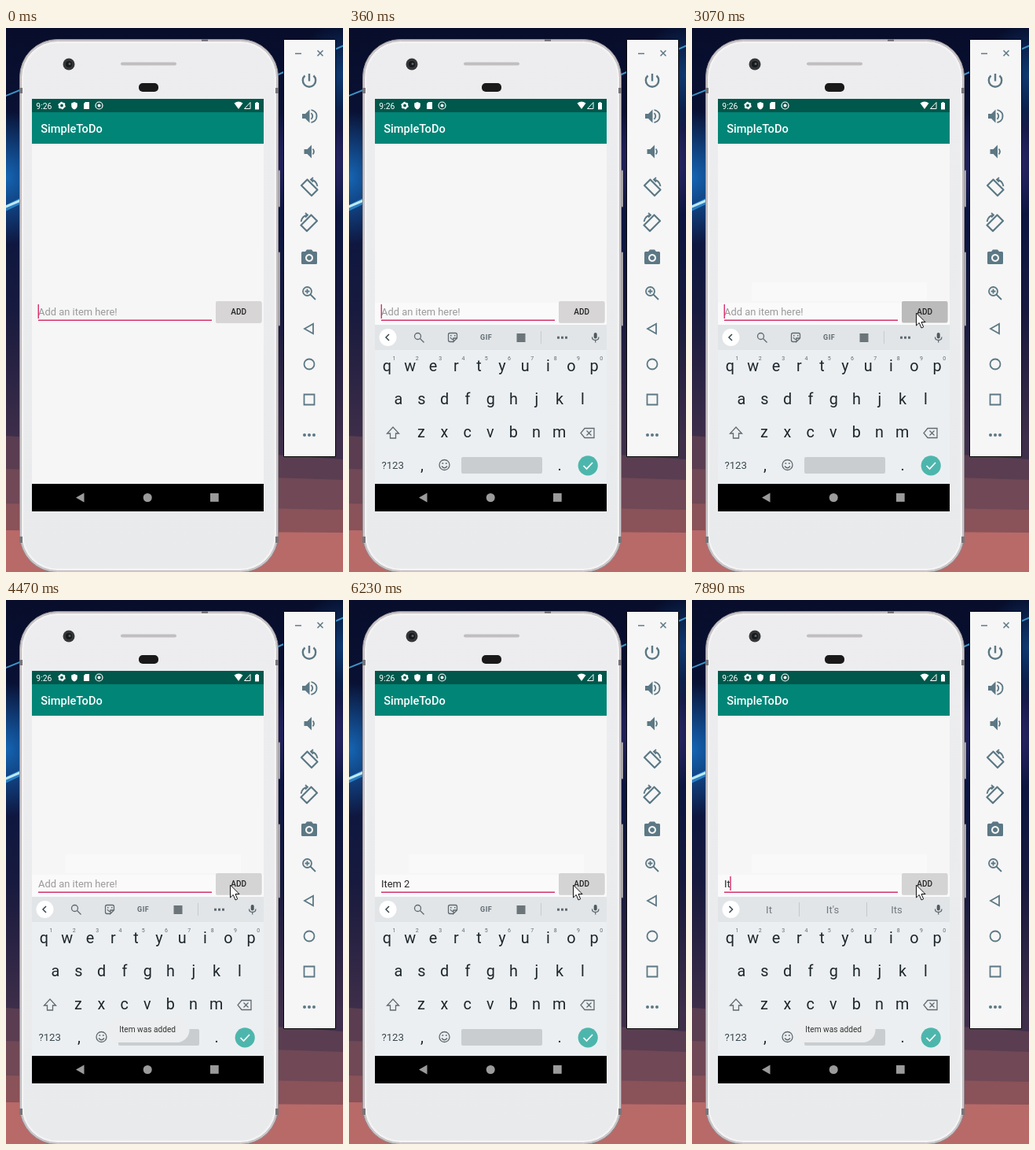
Write an HTML page that moves like this. It is 429x691 px and loops after 8 s.

```html
<!DOCTYPE html>
<html lang="en">
<head>
<meta charset="utf-8">
<style>
  html, body { margin: 0; width: 100%; height: 100%; overflow: hidden; background: #0a1030; }
  svg { display: block; width: 429px; height: 691px; font-family: Roboto, sans-serif; }
  .line { fill: none; stroke: #5c7885; stroke-width: 1.8; }
  .solid { fill: #5c7885; }
  .key { font-size: 19.8px; fill: #1d272c; text-anchor: middle; }
  .digit { font-size: 7px; fill: #5f6a70; text-anchor: middle; }
  .thin { fill: none; stroke: #5f6a70; stroke-width: 1.3; }
  .hint { font-size: 13px; fill: #71797e; text-anchor: middle; }
</style>
</head>
<body>
<svg viewBox="0 0 429 691">
  <defs>
    <linearGradient id="sky" x2="0" y2="1">
      <stop offset="0" stop-color="#070d2a"/>
      <stop offset=".35" stop-color="#0c1640"/>
      <stop offset=".52" stop-color="#171a3e"/>
      <stop offset=".62" stop-color="#282242"/>
      <stop offset=".76" stop-color="#3f2f4b"/>
    </linearGradient>
    <radialGradient id="blue">
      <stop offset="0" stop-color="#1565b4"/>
      <stop offset="1" stop-color="#1565b4" stop-opacity="0"/>
    </radialGradient>
    <radialGradient id="violet">
      <stop offset="0" stop-color="#38307c"/>
      <stop offset="1" stop-color="#38307c" stop-opacity="0"/>
    </radialGradient>
    <linearGradient id="shell" x2="0" y2="1">
      <stop offset="0" stop-color="#ededef"/>
      <stop offset="1" stop-color="#e8eaec"/>
    </linearGradient>
    <clipPath id="screen"><path d="M33 90H328V580H33z"/></clipPath>
  </defs>

  <!-- wallpaper -->
  <path fill="url(#sky)" d="M0 0H429V691H0z"/>
  <path fill="#5a3d50" d="M0 518L429 548V691H0z"/>
  <path fill="#704856" d="M0 560L429 574V691H0z"/>
  <path fill="#8a5259" d="M0 604L429 612V691H0z"/>
  <path fill="#b86a68" d="M0 638L429 641V691H0z"/>
  <ellipse cx="0" cy="190" rx="70" ry="85" fill="url(#blue)"/>
  <ellipse cx="390" cy="170" rx="75" ry="75" fill="url(#violet)"/>
  <ellipse cx="429" cy="60" rx="60" ry="70" fill="url(#blue)" opacity=".5"/>
  <g fill="none" stroke-linecap="round">
    <path stroke="#2a7fc4" stroke-width="7" d="M-5 231L30 214"/>
    <path stroke="#bfeaf5" stroke-width="3" d="M-5 229L30 214"/>
    <path stroke="#3f93c8" stroke-width="2" d="M-5 88L30 74M340 62L435 20"/>
  </g>

  <!-- phone -->
  <path fill="#c9c6c8" stroke="#8f8b8f" d="M345 181h3.500v46h-3.500zM345 285h3.500v93h-3.500z"/>
  <rect x="17.500" y="14.500" width="329" height="677" rx="48" fill="#d3ced1" stroke="#8f8b8f"/>
  <rect x="19.500" y="16.500" width="325" height="673" rx="46" fill="#f4f3f4" stroke="#bcb7ba"/>
  <rect x="22.500" y="19.500" width="319" height="667" rx="43" fill="url(#shell)"/>
  <path fill="#77757a" d="M17 76h4v7h-4zM343 76h4v7h-4zM249 14h8v3h-8zM17 646h4v8h-4zM343 646h4v8h-4z"/>
  <circle cx="80" cy="46" r="7.500" fill="#353638"/>
  <circle cx="80" cy="46" r="4" fill="#17191b"/>
  <circle cx="81" cy="45.500" r="1.500" fill="#59636c"/>
  <rect x="146" y="43.500" width="71" height="4" rx="2" fill="#c1bec0"/>
  <rect x="169" y="70" width="25" height="11" rx="5" fill="#19191a"/>

  <!-- app -->
  <path fill="#f6f6f6" d="M33 90H328V614H33z"/>
  <path fill="#00574b" d="M33 90H328V107H33z"/>
  <path fill="#008577" d="M33 107H328V147H33z"/>
  <g fill="#fff">
    <text x="38.300" y="102.500" font-size="10.400">9:26</text>
    <text x="44.200" y="132.700" font-size="14.600" font-weight="500">SimpleToDo</text>
    <circle cx="71" cy="98.500" r="3" fill="none" stroke="#fff" stroke-width="2.200"/>
    <circle cx="71" cy="98.500" r="4.200" fill="none" stroke="#fff" stroke-width="1.200" stroke-dasharray="2.200 2.200"/>
    <path d="M87 94l3.800 1.500v3q0 3.500-3.800 5q-3.800-1.500-3.800-5v-3zM101 94h5v9h-7v-7zM290.500 95.500q5.500-4 11 0l-5.500 7.500zM317 95h1.500v-1h2v1h1.500v8.500h-5z"/>
    <path d="M303.500 102.500h7.500v-8z" fill="none" stroke="#fff"/>
    <circle cx="118.500" cy="98.500" r="4.500" fill="none" stroke="#fff" stroke-width="1.200"/>
    <circle cx="118.500" cy="98.500" r="2"/>
  </g>
  <path id="panel" fill="#fafafa" d="M33 349H328V377H33z"/>
  <path id="patch" fill="#f9f9f9" d="M76 323H299V347H76z"/>
  <path fill="#d4336c" d="M41 370.500H262V371.900H41z"/>
  <text id="field" x="41" y="365" font-size="12.920" xml:space="preserve"></text>
  <rect id="caret" y="351" width="1.300" height="18" fill="#d81b60"/>
  <rect x="267" y="348" width="58.500" height="27" rx="2" fill="#000" opacity=".12"/>
  <rect id="button" x="267" y="347" width="58.500" height="27" rx="2"/>
  <text x="296.200" y="363.700" font-size="10.050" font-weight="500" text-anchor="middle" fill="#222">ADD</text>

  <g clip-path="url(#screen)">
    <g id="keyboard">
      <path fill="#eceff1" d="M33 377H328V580H33z"/>
      <path fill="#e1e5e8" d="M33 377H328V409H33z"/>
      <circle cx="49.500" cy="393" r="11" fill="#fff"/>
      <path id="chevron" fill="none" stroke="#37474f" stroke-width="1.500"/>
      <g id="tools">
        <circle class="thin" cx="87.500" cy="391.500" r="4"/>
        <path class="thin" d="M90.500 394.500l5 5M133 398.500h-4.500q-2 0-2-2v-7q0-2 2-2h7q2 0 2 2v4.500l-4.500 4.500v-4.500h4.500M129 393q2 3.500 4.500 2"/>
        <path fill="#5f6a70" d="M129 390h1.500v1.500H129zM134 390h1.500v1.500H134z"/>
        <text x="174.700" y="396.200" font-size="9" font-weight="700" letter-spacing=".5" text-anchor="middle" fill="#5f6a70">GIF</text>
        <rect x="213.500" y="388" width="11" height="11" fill="#6b757a"/>
        <path stroke="#c5cbcf" d="M244.500 385V401"/>
        <path fill="#5f6a70" d="M265 391.800h3v3h-3zM270 391.800h3v3h-3zM275 391.800h3v3h-3z"/>
      </g>
      <g id="hints">
        <path stroke="#c2c8cc" d="M136.500 384V402M222.500 384V402"/>
        <text class="hint" x="98" y="398"></text>
        <text class="hint" x="179" y="398"></text>
        <text class="hint" x="260.500" y="398"></text>
      </g>
      <rect x="311.700" y="387" width="4" height="7.500" rx="2" fill="#4f5b61"/>
      <path class="thin" d="M309.500 392.500q0 4 4.200 4t4.200-4M313.700 396.500v3"/>
      <g id="keys"></g>
      <path class="thin" d="M56 507l7.500 8h-4v6h-7v-6h-4zM300 508.500h12v12h-12l-5-6zM302.500 511.500l6 6M308.500 511.500l-6 6"/>
      <text x="55.700" y="560" font-size="13.200" text-anchor="middle" fill="#37474f">?123</text>
      <circle class="thin" cx="121.500" cy="555" r="6.500"/>
      <path class="thin" d="M118 556.500q3.500 4.500 7 0M118.300 553h2M122.800 553h2"/>
      <rect x="143" y="545" width="103" height="21" rx="2" fill="#c9cdd0"/>
      <circle cx="304.200" cy="555.800" r="12.600" fill="#4db6ac"/>
      <path fill="none" stroke="#fff" stroke-width="1.700" d="M298.500 556l4 4l7.500-8"/>
    </g>
    <g id="toast">
      <rect x="127" y="530" width="106.500" height="32" rx="16" fill="#eceeef"/>
      <text x="144.300" y="548.700" font-size="10.150" fill="#333">Item was added</text>
    </g>
  </g>

  <path d="M33 579H328V614H33z"/>
  <g fill="#9b9b9b">
    <path d="M89 596.500l10.500-6v12zM260 591h10.700v10.700h-10.700z"/>
    <circle cx="180.200" cy="596.500" r="5.500"/>
  </g>

  <!-- emulator controls -->
  <path fill="#f6f6f6" stroke="#050505" d="M353.500 14.500H419.500V544.500H353.500z"/>
  <path class="line" style="stroke-width:1.500" d="M368 32.500h8M396.500 28.500l7 7M403.500 28.500l-7 7"/>
  <path class="line" style="stroke-width:2.400" d="M386 58v9.500M380.500 60.500a8.200 8.200 0 1 0 11 0"/>
  <path class="solid" d="M377 109h4l5.500-5.500v17l-5.500-5.500h-4zM379.500 154h4l5.500-5.500v17l-5.500-5.500h-4z"/>
  <path class="line" d="M388.500 108q3.500 4 0 8M388.500 104q9 2.500 6.500 11q-1.500 4-6.500 5M390.500 153.500q3 3.500 0 7"/>
  <g id="turn">
    <path class="line" style="stroke-width:2.200" stroke-linejoin="round" d="M376 200l7.500-7.500l13 13l-7.500 7.500z"/>
    <path class="line" d="M388 192.500q7 1 8.500 8.500M391 190l-3 2.500l3 3"/>
  </g>
  <use href="#turn" transform="matrix(-1 0 0 1 772 45)"/>
  <path class="solid" fill-rule="evenodd" d="M376 285.500q0-1.500 1.500-1.500h3.500l2-2.500h6l2 2.500h3.500q1.500 0 1.500 1.500v13q0 1.500-1.500 1.500h-17q-1.500 0-1.500-1.500zM386 287a5 5 0 1 0 .01 0M386 289a3 3 0 1 0 .01 0"/>
  <circle class="line" cx="383.500" cy="334.500" r="5.500"/>
  <path class="line" d="M387.500 338.500l6.500 6.500M380.500 334.500h6M383.500 331.500v6M380 382l11-6.200v12.400zM379.500 465.500h13v13h-13z"/>
  <circle class="line" cx="386" cy="427" r="6.500"/>
  <g class="solid"><circle cx="380" cy="517" r="2"/><circle cx="386" cy="517" r="2"/><circle cx="392" cy="517" r="2"/></g>

  <path id="mouse" fill="#fff" stroke="#111" d="M0 0V16L3.700 12.500L6.500 19L9.200 17.800L6.500 11.500H11.500z"/>
</svg>

<script>
const $ = id => document.getElementById(id);
const LOOP = 8000;
const KEYBOARD_HEIGHT = 203;

function addKey(label, x, y, cls = 'key') {
  const node = document.createElementNS('http://www.w3.org/2000/svg', 'text');
  node.setAttribute('class', cls);
  node.setAttribute('x', x);
  node.setAttribute('y', y);
  node.textContent = label;
  $('keys').append(node);
}
const addRow = (letters, x, y, cls) => [...letters].forEach((c, i) => addKey(c, x + i * 29.3, y, cls));
addRow('qwertyuiop', 48.4, 436);
addRow('1234567890', 57.5, 421.5, 'digit');
addRow('asdfghjkl', 63, 478);
addRow('zxcvbnm', 92, 520);
addKey(',', 93, 562);
addKey('.', 268, 562);

const IT = ['It', "It's", 'Its'];
const ITEM = ['Item', 'Items', "Item's"];
const NEXT = ['I', 'is', 'and'];
const IDLE = '#d7d5d6', HOVER = '#d3d4d3', PRESSED = '#bbbbbb';

// Each entry changes only the properties it names.
const steps = [
  [0, { text: '', caret: 1, hints: null, button: IDLE, toast: 0, slide: KEYBOARD_HEIGHT, mouse: null }],
  [200, { slide: 70 }],
  [360, { slide: 0 }],
  [500, { caret: 0 }],
  [1210, { text: 'It', caret: 1, hints: IT }],
  [1340, { text: 'Item ', hints: NEXT }],
  [1480, { text: 'Item 1', hints: null }],
  [1910, { caret: 0 }],
  [2220, { caret: 1, mouse: 324 }],
  [2370, { mouse: 343 }],
  [2510, { mouse: 362, button: HOVER }],
  [2650, { caret: 0 }],
  [2790, { button: '#c8c8c8' }],
  [2930, { button: PRESSED }],
  [3070, { text: '', caret: 1 }],
  [3240, { button: HOVER, toast: .5 }],
  [3380, { toast: .85 }],
  [3500, { toast: 1, caret: 0 }],
  [4050, { caret: 1 }],
  [4470, { caret: 0 }],
  [5030, { text: 'It', caret: 1, hints: IT }],
  [5160, { text: 'Item', hints: ITEM }],
  [5290, { toast: .4 }],
  [5420, { text: 'Item ', hints: NEXT, toast: 0 }],
  [5680, { text: 'Item 2', hints: null }],
  [6230, { caret: 0 }],
  [6630, { caret: 1, button: PRESSED }],
  [6770, { text: '' }],
  [6910, { button: HOVER, toast: .5 }],
  [7050, { toast: .85 }],
  [7200, { toast: 1, caret: 0 }],
  [7600, { caret: 1 }],
  [7890, { text: 'It', hints: IT }]
];

const show = (id, on) => $(id).style.display = on ? '' : 'none';
const set = (id, name, value) => $(id).setAttribute(name, value);

function draw(s) {
  const field = $('field');
  field.textContent = s.text || 'Add an item here!';
  set('field', 'fill', s.text ? '#262626' : '#9a9a9a');
  set('caret', 'x', 40.6 + (s.text ? field.getComputedTextLength() : 0));
  show('caret', s.caret);
  set('button', 'fill', s.button);

  const open = s.slide < KEYBOARD_HEIGHT;
  show('keyboard', open);
  show('panel', open);
  set('keyboard', 'transform', `translate(0 ${s.slide})`);
  show('tools', !s.hints);
  show('hints', s.hints);
  set('chevron', 'd', s.hints ? 'M47.500 389l4 4l-4 4' : 'M51 389l-4 4l4 4');
  if (s.hints) document.querySelectorAll('.hint').forEach((n, i) => n.textContent = s.hints[i]);

  set('toast', 'opacity', s.toast);
  show('mouse', s.mouse);
  show('patch', s.mouse);
  if (s.mouse) set('mouse', 'transform', `translate(285.5 ${s.mouse})`);
}

let start, last = -1;
function tick(now) {
  start ??= now;
  const t = (now - start) % LOOP;
  const past = steps.filter(([at]) => at <= t);
  if (past.length !== last) {
    last = past.length;
    draw(Object.assign({}, ...past.map(p => p[1])));
  }
  requestAnimationFrame(tick);
}
requestAnimationFrame(tick);
</script>
</body>
</html>
```
